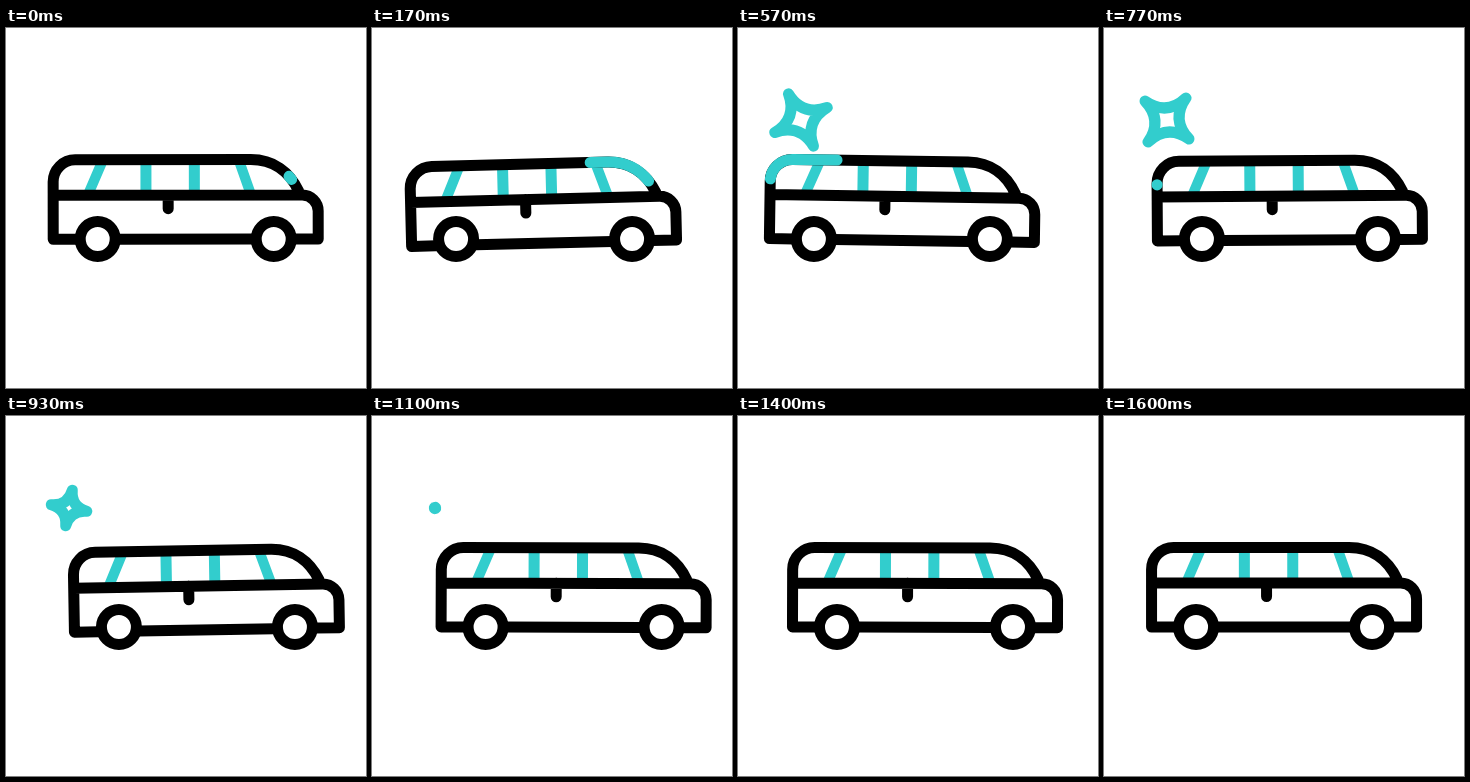
Write an HTML page that moves like this. It is 360x360 px and loops after 1.67 s.

```html
<!DOCTYPE html>
<html lang="en">
<head>
<meta charset="utf-8">
<title>Van</title>
<style>
  html, body { margin: 0; width: 100%; height: 100%; overflow: hidden; background: #fff; }
  svg { display: block; width: 100vw; height: 100vh; }
  .line { fill: none; stroke: #000; stroke-width: 11; stroke-linecap: round; stroke-linejoin: round; }
  .teal { stroke: #32cdcd; }
  .flat { stroke-linecap: butt; }
  .slim { stroke-width: 10.2; }
  .wheel { fill: #fff; }
</style>
</head>
<body>
<svg viewBox="0 0 360 360">
  <path id="star" class="line teal"/>
  <g id="body">
    <path class="line teal flat" d="M140.3 131.5V167M188.7 131.5V167"/>
    <path class="line teal flat slim" d="M97.4 131.5L82.1 167M233 131.5L245.5 167"/>
    <path class="line" d="M293 163C284 144 268 131.5 245 131.5H69.5A22 22 0 0 0 47.5 153.5V211H72M112 211H248M288 211H312.5V183A16 16 0 0 0 296.5 167H47.5M162.5 167V180.5"/>
    <path id="shine" class="line teal" d="M293 163C284 144 268 131.5 245 131.5H69.5A22 22 0 0 0 47.5 153.5V155"/>
  </g>
  <g id="wheels">
    <circle class="line wheel" cx="92" cy="211" r="17.5"/>
    <circle class="line wheel" cx="268" cy="211" r="17.5"/>
  </g>
</svg>
<script>
  const LOOP = 1670, STEP = 100 / 3, LAST = 48;
  const SWINGS = [0, -1.95, 0.85, -1.05, 0.6, 0], SWING_STEPS = 9.25;
  const [star, body, shine, wheels] =
    ['star', 'body', 'shine', 'wheels'].map(id => document.getElementById(id));
  const length = shine.getTotalLength();

  // Eased progress from 0 to 1 between steps a and b.
  function ease(t, a, b) {
    const p = Math.min(Math.max((t - a) / (b - a), 0), 1);
    return p * p * (3 - 2 * p);
  }

  function show(el, on) {
    el.setAttribute('visibility', on ? 'visible' : 'hidden');
  }

  function tiltAt(t) {
    const pos = (t + 1) / SWING_STEPS, i = Math.floor(pos);
    const a = SWINGS[i] || 0, b = SWINGS[i + 1] || 0;
    return a + (b - a) * ease(pos, i, i + 1);
  }

  function drawVan(t) {
    const dx = -21.3 * ease(t, -1, 13.5) + 43.7 * ease(t, 13.5, 29.8) - 22.4 * ease(t, 31, 48.5);
    const tilt = tiltAt(t), drop = Math.abs(tilt) * 2.4;
    body.setAttribute('transform', `translate(${dx} ${drop}) rotate(${tilt} 214 211)`);
    wheels.setAttribute('transform', `translate(${dx} 0)`);
  }

  function drawShine(t) {
    const from = 13.5, span = length - from;
    const head = ease(t, -1.5, 18.5), tail = ease(t, 6, 23.5);
    const dash = Math.max((head - tail) * span, 0.1);
    shine.setAttribute('stroke-dasharray', `${dash} ${length * 2}`);
    shine.setAttribute('stroke-dashoffset', -(from + tail * span));
    show(shine, tail < 1);
  }

  function drawStar(t) {
    const r = 29 * (ease(t, 5, 15.5) - ease(t, 23.7, 34)), c = r * 0.09;
    const u = t - 21, spin = 48 - 3.5 * u - 0.038 * u ** 3;
    star.setAttribute('d',
      `M0 ${-r}Q${c} ${-c} ${r} 0Q${c} ${c} 0 ${r}Q${-c} ${c} ${-r} 0Q${-c} ${-c} 0 ${-r}Z`);
    star.setAttribute('transform', `translate(63 92) rotate(${spin})`);
    show(star, r > 0.3);
  }

  function draw(ms) {
    const t = Math.min(Math.floor((ms % LOOP + 5) / STEP), LAST);
    drawVan(t);
    drawShine(t);
    drawStar(t);
  }

  const start = performance.now();
  function tick() {
    draw(performance.now() - start);
    requestAnimationFrame(tick);
  }
  draw(0);
  requestAnimationFrame(tick);
</script>
</body>
</html>
```
